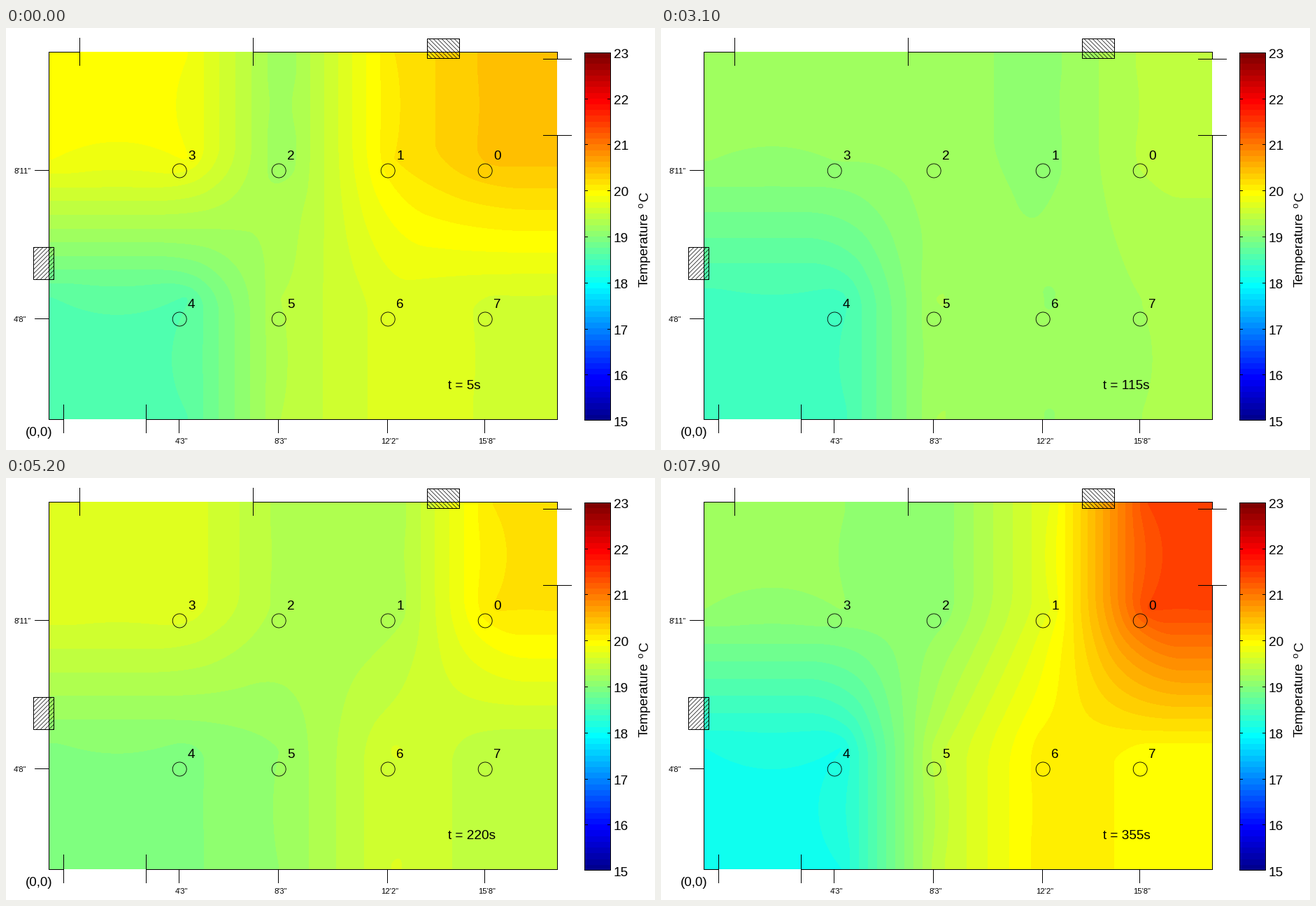
Write a matplotlib script that moves like this. It is 928 px wide and 603 px high and loops after 8 s.

```python
import numpy as np
import matplotlib.pyplot as plt
from matplotlib.animation import FuncAnimation
from matplotlib.collections import LineCollection
from matplotlib.colors import ListedColormap
from matplotlib.patches import Circle, Rectangle

WIDTH, HEIGHT, DPI = 928, 603, 64
PX = 72 / DPI
LEFT, TOP, RIGHT, BOTTOM = 61, 34, 788, 559
FRAMES, STEP_MS = 80, 100

plt.rcParams["font.family"] = "Liberation Sans"

# Grid of the interpolation nodes; the outer ring repeats the nearest sensor.
NODE_X = np.array([LEFT, 257, 396, 556, 698, RIGHT]) + 0.0137
NODE_Y = np.array([TOP, 186, 387, BOTTOM]) + 0.0071
NODE_X[0], NODE_Y[0] = LEFT - 0.01, TOP - 0.02
SENSOR = [[3, 3, 2, 1, 0, 0]] * 2 + [[4, 4, 5, 6, 7, 7]] * 2

# Sensor temperatures 0..7 at some moments (animation step, values).
KEY_STEPS = [9, 14, 24, 31, 46, 58, 79]
READINGS = np.array([
    [20.425, 20.13, 19.13, 19.89, 18.61, 19.39, 19.70, 19.605],
    [19.56, 20.08, 20.115, 19.51, 17.865, 19.11, 19.238, 19.30],
    [19.1255, 19.13, 18.825, 19.885, 19.17, 18.94, 19.39, 19.11],
    [19.42, 19.085, 19.165, 19.14, 18.45, 19.26, 19.118, 19.26],
    [20.77, 19.44, 19.56, 20.08, 19.42, 19.305, 19.98, 19.18],
    [19.51, 19.11, 19.09, 19.35, 18.52, 18.96, 19.303, 19.61],
    [21.40, 19.74, 19.02, 19.13, 18.12, 19.46, 20.11, 19.94],
])


def jet64():
    i = np.arange(1, 65)
    ramps = [np.minimum(i - 24, 72 - i), np.minimum(i - 8, 56 - i),
             np.minimum(i + 8, 40 - i)]
    return ListedColormap(np.clip(np.array(ramps).T / 16, 0, 1))


def circumcentre(p, b, c):
    bx, by = b[0] - p[0], b[1] - p[1]
    cx, cy = c[0] - p[0], c[1] - p[1]
    d = 2 * (bx * cy - by * cx)
    bb, cc = bx * bx + by * by, cx * cx + cy * cy
    return p[0] + (cy * bb - by * cc) / d, p[1] + (bx * cc - cx * bb) / d


def cross(u, w, o):
    return (u[0] - o[0]) * (w[1] - o[1]) - (u[1] - o[1]) * (w[0] - o[0])


def natural_weights():
    """Natural neighbour weight of every sensor at every pixel."""
    gx, gy = np.meshgrid(np.arange(LEFT, RIGHT) + 0.5,
                         np.arange(TOP, BOTTOM) + 0.5)
    weights = np.zeros(gx.shape + (8,))
    for row in range(len(NODE_Y) - 1):
        for col in range(len(NODE_X) - 1):
            x0, x1 = NODE_X[col:col + 2]
            y0, y1 = NODE_Y[row:row + 2]
            mid = (x0 + x1) / 2, (y0 + y1) / 2
            radius2 = ((x1 - x0) ** 2 + (y1 - y0) ** 2) / 4
            near = (gx - mid[0]) ** 2 + (gy - mid[1]) ** 2 < radius2
            p = gx[near], gy[near]
            corners = [(x0, y0), (x1, y0), (x1, y1), (x0, y1)]
            ids = [SENSOR[row][col], SENSOR[row][col + 1],
                   SENSOR[row + 1][col + 1], SENSOR[row + 1][col]]
            for tri in ((0, 1, 2), (0, 2, 3)):
                pts = [corners[k] for k in tri]
                opposite = [circumcentre(p, pts[k - 2], pts[k - 1])
                            for k in range(3)]
                for k in range(3):
                    area = cross(opposite[k - 2], opposite[k - 1], mid)
                    weights[near, ids[tri[k]]] += area
    weights /= weights.sum(axis=2, keepdims=True)
    return weights.astype(np.float32)


WEIGHTS = natural_weights()


def field(step):
    values = [np.interp(step, KEY_STEPS, col) for col in READINGS.T]
    return WEIGHTS @ np.array(values, dtype=np.float32)


fig = plt.figure(figsize=(WIDTH / DPI, HEIGHT / DPI), dpi=DPI, facecolor="white")
ax = fig.add_axes([0, 0, 1, 1])
ax.axis("off")


def lines(segments, width=1, clip=None):
    group = LineCollection(segments, colors="black", linewidths=width * PX,
                           capstyle="butt", snap=False, zorder=3)
    ax.add_collection(group, autolim=False)
    if clip is not None:
        group.set_clip_path(clip)


def hline(y, x0, x1):
    return [(x0, y + 0.5), (x1, y + 0.5)]


def vline(x, y0, y1):
    return [(x + 0.5, y0), (x + 0.5, y1)]


def label(x, y, text, size=19, **kw):
    return ax.text(x, y, text, fontsize=size * PX, color="black", zorder=5, **kw)


def box(x0, y0, x1, y1):
    patch = Rectangle((x0 + 0.5, y0 + 0.5), x1 - x0, y1 - y0, fill=False,
                      ec="black", lw=PX, snap=False, zorder=4)
    return ax.add_patch(patch)


def hatched(x0, y0, x1, y1, slope):
    frame = box(x0, y0, x1, y1)
    h = y1 - y0
    starts = np.arange(x0 - h, x1 + h, 6) + 0.5
    lines([[(s, y0), (s + slope * h, y1)] for s in starts], 0.7, frame)


cmap = jet64()
scale = dict(cmap=cmap, vmin=15, vmax=23, interpolation="nearest", aspect="auto")
room = ax.imshow(field(0), extent=(LEFT, RIGHT, BOTTOM, TOP), zorder=1, **scale)

# Walls with door and window gaps
lines([
    vline(61, 34, 560), hline(34, 61, 106), hline(34, 354, 789),
    vline(788, 34, 45), vline(788, 154, 560),
    hline(559, 61, 83), hline(559, 201, 789),
    vline(105, 14, 54), vline(353, 14, 54),
    vline(82, 538, 579), vline(200, 538, 579),
    hline(44, 768, 809), hline(153, 768, 809),
])
hatched(602, 15, 648, 43, 1)
hatched(39, 313, 68, 359, -1)

# Sensors
cols, rows = [248, 390, 546, 685], [204, 416]
for y, names in zip(rows, ("3210", "4567")):
    for x, name in zip(cols, names):
        ax.add_patch(Circle((x + 0.2, y), 10, fill=False, ec="black",
                            lw=0.85 * PX, zorder=4))
        label(x + 12, y - 15.5, name)

# Distance marks
for x, text in zip(cols, ("4'3\"", "8'3\"", "12'2\"", "15'8\"")):
    lines([vline(x - 1, 559, 579)])
    label(x + 3, 594, text, 11.3, ha="center")
for y, text in zip(rows, ("8'11\"", "4'8\"")):
    lines([hline(y - 1, 41, 62)])
    label(11, y + 4, text, 11.3)
label(28, 583, "(0,0)", 18.7)

# Colour scale
bar_x0, bar_x1, bar_y0, bar_y1 = 827, 864, 35, 561
ax.imshow((15 + (np.arange(64) + 0.5) / 8)[::-1, None],
          extent=(bar_x0, bar_x1, bar_y1, bar_y0), zorder=1, **scale)
box(bar_x0, bar_y0, bar_x1, bar_y1 - 1)
for deg in range(15, 24):
    y = round(bar_y1 - (deg - 15) * (bar_y1 - bar_y0) / 8)
    if 15 < deg < 23:
        lines([hline(y, bar_x0, bar_x0 + 5), hline(y, bar_x1 - 4, bar_x1 + 1)])
    label(869, y + 8, str(deg))
turned = dict(rotation=90, rotation_mode="anchor", ha="left", va="baseline")
label(918, 370, "Temperature", **turned)
label(911, 257, "o", 13, **turned)
label(918, 247, "C", **turned)

clock = label(631.5, 515.5, "")
ax.set_xlim(0, WIDTH)
ax.set_ylim(HEIGHT, 0)


def draw(step):
    room.set_data(field(step))
    clock.set_text(f"t = {5 * max(1, step - 8)}s")
    return room, clock


anim = FuncAnimation(fig, draw, frames=FRAMES, interval=STEP_MS,
                     repeat=True, repeat_delay=0, blit=False)
plt.show()
```
